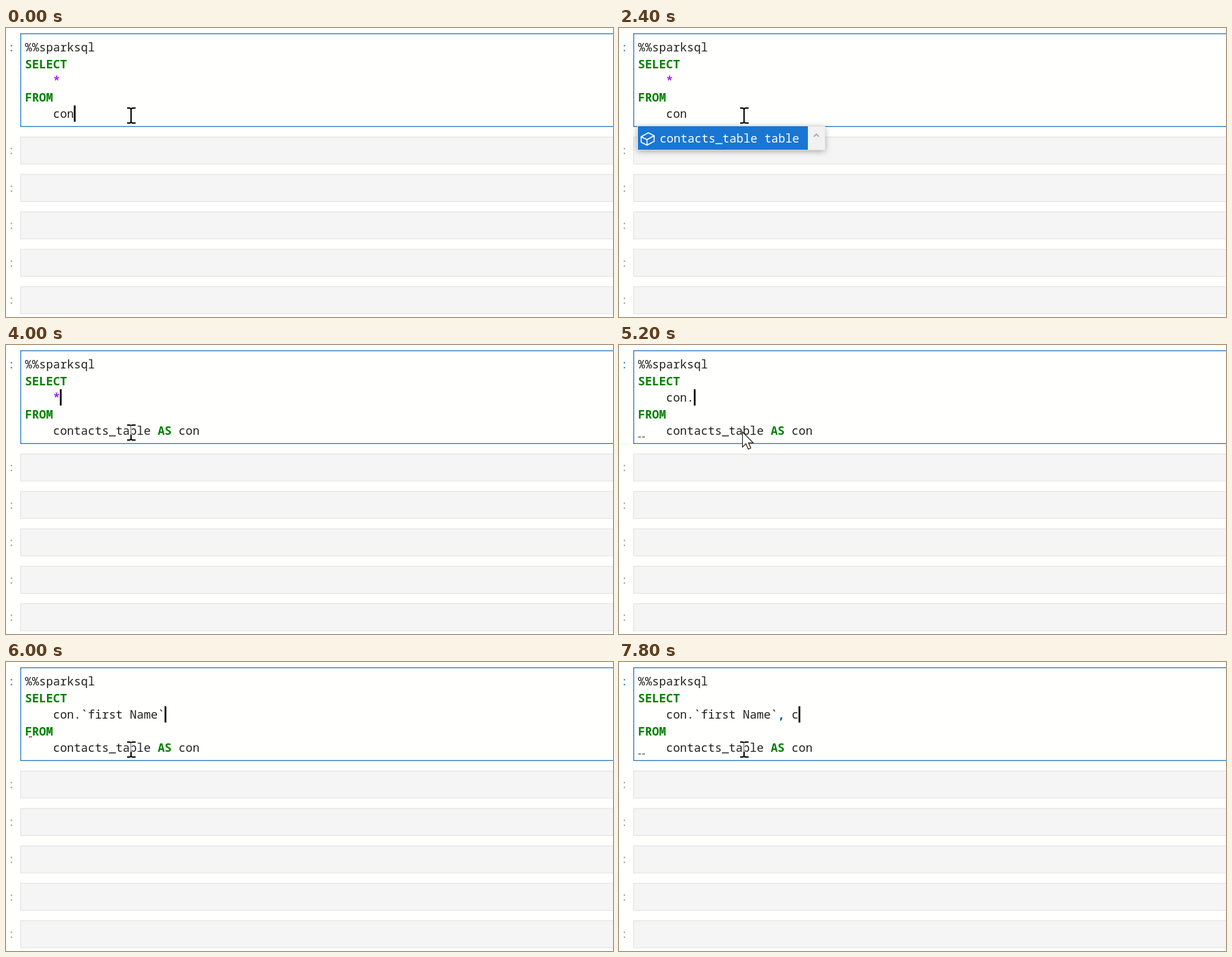
These frames come from a looping animation (932 by 444 pixels, 8000 ms). An HTML page:

```html
<!DOCTYPE html>
<html lang="en">
<head>
<meta charset="utf-8">
<title>SQL completion in a notebook</title>
<style>
  html, body { margin: 0; width: 100%; height: 100%; overflow: hidden; background: #fffffe; }
  svg { display: block; width: 932px; height: 444px; background: #fffffe; }
  text { font: 17.87px "Noto Sans Mono", "DejaVu Sans Mono", monospace; fill: #212121; white-space: pre; }
  .kw { font-weight: 700; fill: #008000; }
  .op { font-weight: 700; fill: #a020f0; }
  .punct { font-weight: 700; fill: #0055aa; }
  .light { fill: #fff; }
  .prompt { fill: #9e9e9e; }
  .prompt.active { fill: #307fc1; }
  .popup { filter: drop-shadow(0 2px 5px rgba(0, 0, 0, .33)); }
  #beam { fill: #fff; mix-blend-mode: difference; }
</style>
</head>
<body>
<svg id="stage" viewBox="0 0 932 444">
  <g id="cells"></g>
  <rect x="22.6" y="8.8" width="920" height="142.6" fill="#fffffe" stroke="#2277bb" stroke-width="1.3"/>
  <g id="code"></g>
  <path id="lintMark" d="M29.5 141.3h4.2m1.8 0h4.2" stroke="#444" stroke-width="1.2"/>
  <path id="errorMark" d="M35 115h5" stroke="#d32f2f" stroke-width="1.6"/>
  <rect id="caret" width="2.7" height="25"/>

  <g id="tables">
    <g class="popup">
      <rect x="28" y="150.5" width="288.5" height="37" fill="#f1f1f1"/>
      <rect x="29" y="151" width="261" height="36" fill="#1976d2"/>
    </g>
    <path d="M34 167l11-6 9 4.5v8.5l-11 6-9-4.5zl9 4.5 11-6M43 171.5v8.5" fill="none" stroke="#fff" stroke-width="1.5" stroke-linejoin="round"/>
    <text class="light" x="62.4" y="176">contacts_table table</text>
    <path d="M299 167l4-4 4 4" fill="none" stroke="#a8a8a8" stroke-width="1.8"/>
  </g>

  <g id="columns">
    <g class="popup">
      <rect x="60.5" y="99.5" width="448" height="360" fill="#fffffe" stroke="#c4c4c4"/>
    </g>
    <rect x="61" y="100" width="421" height="36" fill="#4a92dc"/>
    <rect x="482" y="100" width="26" height="344" fill="#f1f1f1"/>
    <rect x="484" y="126" width="23" height="274" fill="#cdcdcd"/>
    <path d="M491 116.5l4.5-4.5 4.5 4.5" fill="none" stroke="#505050" stroke-width="2"/>
    <text class="light" x="331" y="125">column string</text>
    <g id="rows"></g>
  </g>

  <path id="beam" d="M186 122h4.5l1.5 1 1.5-1h5.5v2h-5l-1 1v19l1 1h5v2h-5.5l-1.5-1-1.5 1H186v-2h4l1-1v-19l-1-1h-4z"/>
  <path id="arrow" d="M189.6 133.6v23.2l5.3-5 3.6 8.2 3.9-1.7-3.6-8h7.2z" fill="#fff" stroke="#111" stroke-width="1.1"/>
</svg>
<script>
const LOOP = 8000, LEFT = 29.3, CHAR = 10.72, TOP = 36, LEADING = 25.5;
const $ = id => document.getElementById(id);

function add(parent, tag, attrs, text = '') {
  const el = document.createElementNS('http://www.w3.org/2000/svg', tag);
  for (const key in attrs) el.setAttribute(key, attrs[key]);
  el.textContent = text;
  parent.append(el);
  return el;
}

add($('cells'), 'text', { class: 'prompt active', x: 2.9, y: 36 }, ':');
for (let i = 0; i < 5; i++) {
  const y = 167.5 + 57.5 * i;
  add($('cells'), 'rect', { x: 22.5, y, width: 920, height: 41.5, fill: '#f5f5f5', stroke: '#e0e0e0' });
  add($('cells'), 'text', { class: 'prompt', x: 2.9, y: y + 26.5 }, ':');
}

const fields = ['`first Name`', '`last Name`', 'address', 'age', 'phoneNumbers', 'address.city',
  'address.postalCode', 'address.state', 'address.streetAddress', 'phoneNumbers.number'];
fields.forEach((name, i) => {
  const y = 118.3 + 36 * i, ink = i ? '#0277bd' : '#fff';
  add($('rows'), 'circle', { cx: 68.8, cy: y, r: 3.2, fill: ink });
  add($('rows'), 'path', { d: `M69 ${y}h7.5`, stroke: ink, 'stroke-width': 1.6 });
  add($('rows'), 'circle', { cx: 81.2, cy: y, r: 4.6, fill: 'none', stroke: ink, 'stroke-width': 1.7 });
  add($('rows'), 'text', { class: i ? '' : 'light', x: 93.6, y: 125 + 36 * i }, name);
});

const lines = Array.from({ length: 5 }, (_, i) =>
  add($('code'), 'text', { x: LEFT, y: TOP + LEADING * i }));

function setLine(row, source) {
  const el = lines[row];
  if (el.dataset.source === source) return;
  el.dataset.source = source;
  el.textContent = '';
  for (const part of source.split(/(\b(?:SELECT|FROM|AS)\b|\*|,)/)) {
    const kind = part === '*' ? 'op' : part === ',' ? 'punct' : /^(SELECT|FROM|AS)$/.test(part) ? 'kw' : '';
    if (part) add(el, 'tspan', { class: kind }, part);
  }
}

setLine(0, '%%sparksql');
setLine(1, 'SELECT');
setLine(3, 'FROM');

// Each step changes only the listed fields; the rest carry over.
const steps = [
  [0, { fields: '*', table: 'con', row: 4, caret: 1, popup: '', pointer: 'beam', mark: '' }],
  [200, { caret: 0 }],
  [600, { caret: 1 }],
  [1200, { caret: 0 }],
  [1600, { caret: 1, popup: 'tables' }],
  [2400, { caret: 0 }],
  [2800, { caret: 1, popup: '', table: 'contacts_table' }],
  [3400, { table: 'contacts_table A' }],
  [3600, { table: 'contacts_table AS c' }],
  [3800, { table: 'contacts_table AS con' }],
  [4000, { row: 2 }],
  [4200, { fields: '' }],
  [4400, { fields: 'con' }],
  [4800, { fields: 'con.' }],
  [5000, { pointer: 'arrow' }],
  [5200, { mark: 'lintMark' }],
  [5400, { popup: 'columns' }],
  [5600, { caret: 0 }],
  [6000, { caret: 1, popup: '', fields: 'con.`first Name`', pointer: 'beam', mark: 'errorMark' }],
  [6600, { caret: 0, mark: '' }],
  [6800, { caret: 1, fields: 'con.`first Name`,' }],
  [7000, { mark: 'lintMark' }],
  [7400, { fields: 'con.`first Name`, ' }],
  [7800, { fields: 'con.`first Name`, c' }],
];

const show = (id, on) => { $(id).style.display = on ? '' : 'none'; };

function draw(time) {
  const s = Object.assign({}, ...steps.filter(step => step[0] <= time).map(step => step[1]));
  setLine(2, '    ' + s.fields);
  setLine(4, '    ' + s.table);
  const typed = s.row === 2 ? s.fields : s.table;
  $('caret').setAttribute('x', LEFT + CHAR * (4 + typed.length) - .2);
  $('caret').setAttribute('y', TOP + LEADING * s.row - 19);
  show('caret', s.caret);
  for (const id of ['tables', 'columns']) show(id, s.popup === id);
  for (const id of ['beam', 'arrow']) show(id, s.pointer === id);
  for (const id of ['lintMark', 'errorMark']) show(id, s.mark === id);
}

const start = performance.now();
function tick() {
  draw((performance.now() - start) % LOOP);
  requestAnimationFrame(tick);
}
tick();
</script>
</body>
</html>
```
